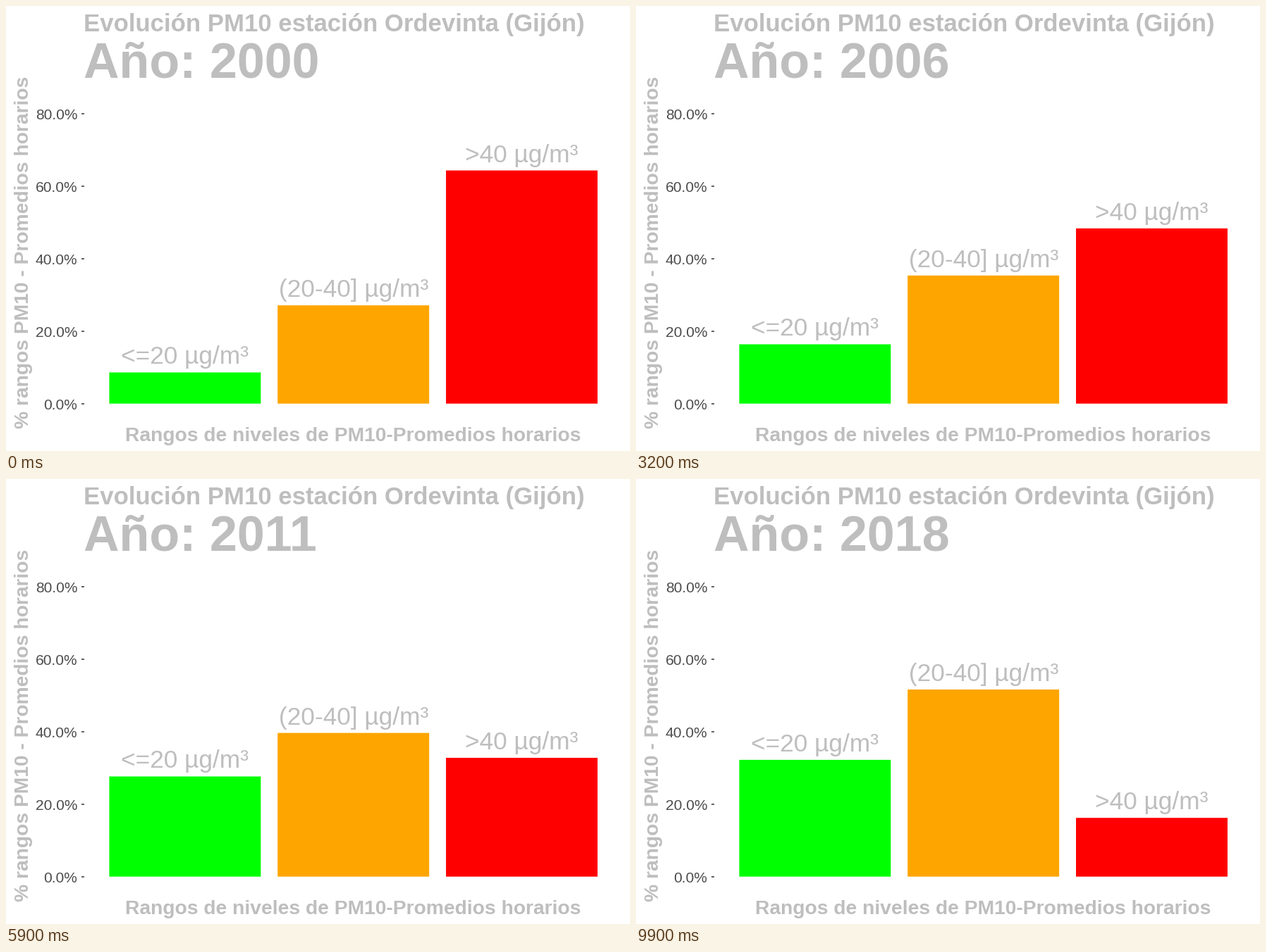
These frames come from a looping animation (885 by 632 pixels, 10 s). A matplotlib script:

```python
import numpy as np
import matplotlib.pyplot as plt
from matplotlib.animation import FuncAnimation

W, H, DPI = 885, 632, 64
FRAMES, STEP = 100, 100
FIRST, LAST = 2000, 2018
BASE, UNIT = 564.7, 5.15        # y of 0 %, pixels per percent point
LEFT, SLOT = 253.9, 238.8       # centre of the first bar, distance to the next
BAR_W = 0.9 * SLOT
GREY, DARK = "#bebebe", "#4d4d4d"

# Shares of the outer classes every second year; the middle one is the rest.
LOW = [8.6, 2.7, 8.9, 17.1, 29.8, 28.2, 26.6, 28.2, 49.3, 32.2]
HIGH = [64.3, 80, 61.5, 47, 28.3, 31.6, 34.8, 23.4, 14.2, 16.2]
KEYS = np.linspace(0, FRAMES - 1, len(LOW))

CLASSES = [("#00ff00", "<=20 µg/m³"),
           ("#ffa500", "(20-40] µg/m³"),
           ("#ff0000", ">40 µg/m³")]

plt.rcParams["font.family"] = "Liberation Sans"
fig = plt.figure(figsize=(W / DPI, H / DPI), dpi=DPI, facecolor="white")
ax = fig.add_axes([0, 0, 1, 1])
ax.set_xlim(0, W)
ax.set_ylim(H, 0)
ax.axis("off")


def label(x, y, text, px, color=GREY, **kw):
    kw = {"ha": "center", "va": "baseline", **kw}
    return ax.text(x, y, text, fontsize=px * 72 / DPI, color=color, **kw)


def shares(i):
    low, high = np.interp(i, KEYS, LOW), np.interp(i, KEYS, HIGH)
    return low, 100 - low - high, high


label(110.5, 36.4, "Evolución PM10 estación Ordevinta (Gijón)", 34.75,
      ha="left", weight="bold")
year_text = label(110.3, 102, "", 70, ha="left", weight="bold")
label(492.4, 618, "Rangos de niveles de PM10-Promedios horarios", 28.25,
      weight="bold")
label(32, 350.3, "% rangos PM10 - Promedios horarios", 28.3,
      weight="bold", rotation=90, rotation_mode="anchor")

for pct in range(0, 81, 20):
    y = BASE - pct * UNIT
    label(101.4, y + 8, f"{pct:.1f}%", 21, DARK, ha="right")
    ax.plot([106.5, 110.5], [y, y], color="#333333", lw=1.5 * 72 / DPI,
            solid_capstyle="butt")

bars, tags = [], []
for k, (color, text) in enumerate(CLASSES):
    x = LEFT + k * SLOT
    bars.append(ax.add_patch(plt.Rectangle((x - BAR_W / 2, BASE), BAR_W, 0,
                                           facecolor=color, lw=0, snap=False)))
    tags.append(label(x, BASE, text, 35.25))


def update(i):
    year = FIRST + i * (LAST - FIRST) / (FRAMES - 1)
    year_text.set_text(f"Año: {round(year)}")
    for bar, tag, share in zip(bars, tags, shares(i)):
        bar.set_height(-share * UNIT)
        tag.set_y(BASE - share * UNIT - 12)
    return [year_text, *bars, *tags]


anim = FuncAnimation(fig, update, frames=FRAMES, interval=STEP,
                     repeat=True, repeat_delay=0, blit=False)
plt.show()
```
